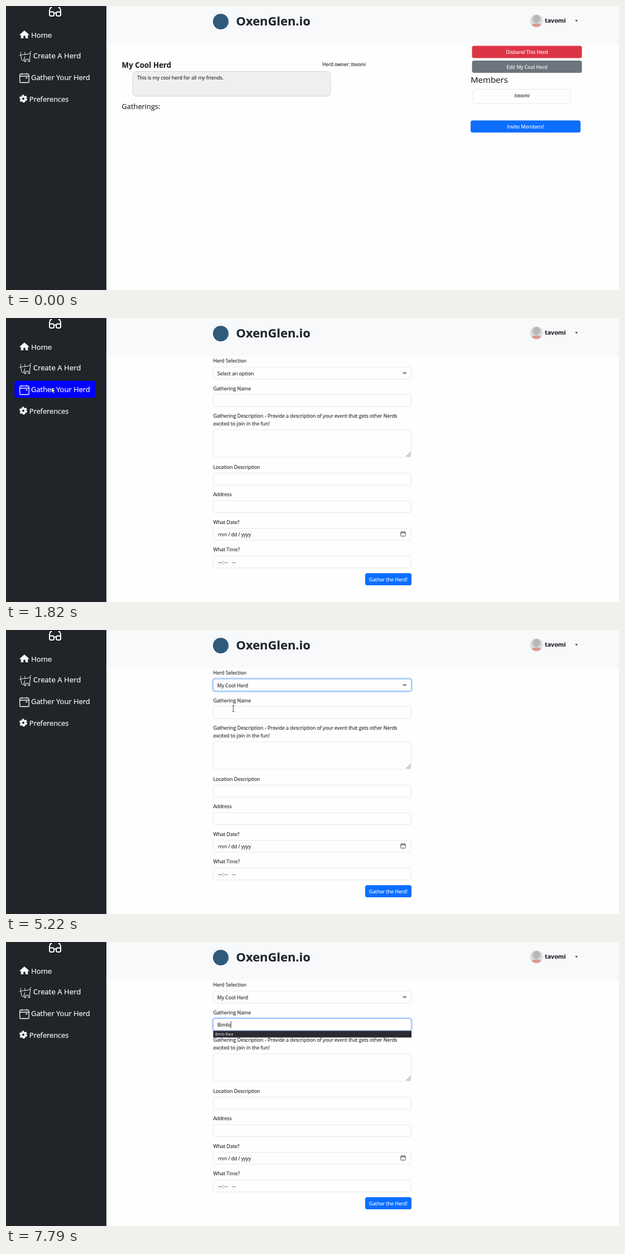
These frames come from a looping animation (1099 px wide and 510 px high, 8 s). An HTML page:

```html
<!DOCTYPE html>
<html lang="en">
<head>
<meta charset="utf-8">
<title>Gather your herd</title>
<style>
  html, body { margin: 0; width: 100%; height: 100%; overflow: hidden; background: #fefefe; }
  svg { display: block; width: 100vw; height: 100vh; }
  text { font: 8.8px "Open Sans", "Noto Sans", sans-serif; fill: #212529; stroke: #212529; stroke-width: .15; white-space: pre; }
  .nav text { font-size: 12.95px; fill: #fff; stroke: #fff; stroke-width: .2; }
  .nav .wide { font-size: 13.15px; }
  .nav .narrow { font-size: 12.75px; }
  .icon { fill: none; stroke: #fff; stroke-width: 1.3; stroke-linecap: round; stroke-linejoin: round; }
  .solid { fill: #fff; }
  .mid { text-anchor: middle; }
  .light { fill: #fff; stroke: #fff; }
  .bold { font-weight: 700; }
  .italic { font-style: italic; }
  .field { fill: #fefefe; stroke: #dee2e6; stroke-width: .8; }
  .mark { fill: none; stroke: #343a40; stroke-width: 1.1; stroke-linecap: round; stroke-linejoin: round; }
  .thin { stroke-width: .9; }
  #suggest text { font-size: 6.3px; fill: #fbfbfe; stroke: none; }
</style>
</head>
<body>
<svg viewBox="0 0 1099 510" preserveAspectRatio="none">
  <defs>
    <g id="ring">
      <rect x="370.2" y="-1.3" width="357.6" height="24.1" rx="4.6" fill="none" stroke="#0d6efd" stroke-opacity=".25" stroke-width="2.3"/>
      <rect x="371.5" width="355" height="21.5" rx="3.5" fill="none" stroke="#86b7fe" stroke-width=".9"/>
    </g>
    <rect id="input" class="field" x="371.5" width="355" height="21.5" rx="3.5"/>
  </defs>

  <rect width="1099" height="510" fill="#fefefe"/>
  <rect x="180" width="919" height="69" fill="#f8f9fb"/>
  <rect width="180" height="510" fill="#212529"/>

  <g class="nav">
    <rect id="hover" x="15.2" y="112.8" width="144.8" height="30.5" rx="3.5" fill="#00f"/>
    <g class="icon" style="stroke-width:2">
      <rect x="78" y="10.5" width="8" height="7.5" rx="2.8"/>
      <rect x="90" y="10.5" width="8" height="7.5" rx="2.8"/>
      <path d="M86 12.5h4M78 13V8l1.6-5h2M98 13V8l-1.6-5h-2"/>
    </g>
    <path class="solid" d="M33 44l8.4 7.3-1 1.2h-1.2V58h-4.4v-4.5h-3.6V58h-4.4v-5.5h-1.2l-1-1.2z"/>
    <g class="icon" style="stroke-width:1">
      <path d="M26.5 83c-1.500 3 0 4.500 2.500 4.500h2c2.500 0 4-1.500 2.500-4.500M27.500 88l-3 .5 2.500 2 1 5.500 1.500 2h1.500l1.500-2 1-5"/>
      <path d="M33.500 87.500c3-1.500 6-.5 10-2.500v-2l1-1.500M43.500 85c.5 4-1 6-1 9v6H40v-5c-2 1-3 1-4.500.5V100H33v-4"/>
    </g>
    <g class="icon">
      <rect x="24.7" y="122.2" width="16.5" height="15.3" rx="2"/>
      <path d="M25 126h16M28.5 120.8v1.5M37.3 120.8v1.5"/>
      <rect x="36" y="128.5" width="2" height="1.5" fill="#fff" stroke-width=".6"/>
    </g>
    <circle cx="31" cy="166.5" r="3.8" fill="none" stroke="#fff" stroke-width="3.4"/>
    <circle cx="31" cy="166.5" r="6" fill="none" stroke="#fff" stroke-width="2.2" stroke-dasharray="3.6 2.683"/>
    <text class="wide" x="45" y="56.5">Home</text>
    <text class="wide" x="48.8" y="94.3">Create A Herd</text>
    <text x="45" y="133.3">Gather Your Herd</text>
    <text class="narrow" x="41.8" y="171.5">Preferences</text>
  </g>

  <circle cx="385" cy="28" r="14" fill="#2f5a7c"/>
  <text class="bold" x="412.5" y="34.7" style="font-size:21.9px">OxenGlen.io</text>
  <circle cx="951" cy="26.5" r="11.5" fill="#dcdcdc"/>
  <path d="M942 33.5q9-5 18 0a11.5 11.5 0 0 1-18 0z" fill="#d99a92"/>
  <circle cx="951.2" cy="23" r="7" fill="#b9b9b9"/>
  <text class="bold" x="966" y="29.7" style="font-size:10.7px">tavomi</text>
  <path d="M1020.2 25.3h5l-2.5 2.7z" fill="#212529"/>

  <g id="herd">
    <text class="bold" x="207.5" y="110.7" style="font-size:13.4px">My Cool Herd</text>
    <text x="567" y="108" style="font-size:8.6px">Herd owner: <tspan class="italic">tavomi</tspan></text>
    <rect x="227.5" y="117.5" width="354" height="44.5" rx="6" fill="#efefef" stroke="#d0d3d6"/>
    <text x="235" y="131.5">This is my cool herd for all my friends.</text>
    <text x="207.5" y="184.7" style="font-size:12.85px">Gatherings:</text>
    <rect x="835.5" y="71.5" width="197" height="22" rx="3.5" fill="#dc3545"/>
    <text class="mid light" x="934" y="86.2">Disband This Herd</text>
    <rect x="835.5" y="98" width="197" height="22" rx="3.5" fill="#6c757d"/>
    <text class="mid light" x="934" y="112.8">Edit My Cool Herd</text>
    <text x="833" y="138" style="font-size:15px">Members</text>
    <rect class="field" x="837.5" y="149.5" width="175" height="25.5" rx="3.5"/>
    <text class="mid italic" x="925.2" y="164.3">tavomi</text>
    <rect x="833" y="205.5" width="197" height="21.8" rx="3.5" fill="#0d6efd"/>
    <text class="mid light" x="931.7" y="220">Invite Members!</text>
  </g>

  <g id="form">
    <text x="371.5" y="80.2">Herd Selection</text>
    <text x="371.5" y="129.7">Gathering Name</text>
    <text x="371.5" y="179.3">Gathering Description - Provide a description of your event that gets other Nerds</text>
    <text x="371.5" y="193.2">excited to join in the fun!</text>
    <text x="371.5" y="270.5">Location Description</text>
    <text x="371.5" y="320.2">Address</text>
    <text x="371.5" y="369.8">What Date?</text>
    <text x="371.5" y="419.3">What Time?</text>
    <use href="#input" y="88"/>
    <use href="#input" y="137.5"/>
    <rect class="field" x="371.5" y="201" width="355" height="49" rx="3.5"/>
    <use href="#input" y="278.5"/>
    <use href="#input" y="328"/>
    <use href="#input" y="377.5"/>
    <use href="#input" y="427.3"/>
    <path d="M717.5 249l8-8M720.5 249l5-5M723.5 249l2-2" stroke="#6c6f80" fill="none"/>
    <path class="mark" d="M712 97.5l2.7 2.7 2.7-2.7"/>
    <rect class="mark thin" x="707.7" y="384.3" width="8.4" height="7.5" rx="1"/>
    <path class="mark thin" d="M708 386h8M709.8 383.3v1M714 383.3v1"/>
    <text id="choice" x="378.7" y="102.6"></text>
    <text x="380.5" y="392.2" style="font-size:8.5px">mm / dd / yyyy</text>
    <text x="380.5" y="442" style="letter-spacing:1px">--:--  --</text>
    <rect x="644" y="458.3" width="83" height="21.7" rx="3.5" fill="#0d6efd"/>
    <text class="mid light" x="685.3" y="472.8">Gather the Herd!</text>
    <use id="selectRing" href="#ring" y="88"/>
    <use id="nameRing" href="#ring" y="137.5"/>
    <text id="typed" x="379" y="152.2"></text>
    <rect id="caret" y="142.5" width="1" height="12" fill="#212529"/>
    <g id="options">
      <rect x="372" y="110" width="354.5" height="41.5" fill="#fff" stroke="#8f8f9d" stroke-width=".9"/>
      <rect id="row" x="374.5" width="349.5" height="18" fill="#e0e0e6"/>
      <text x="378" y="125.2">Select an option</text>
      <text x="378" y="143.7">My Cool Herd</text>
    </g>
    <g id="suggest">
      <rect id="suggestBox" x="371.5" y="159.5" width="355.5" fill="#2b2a33"/>
      <text x="375" y="168">Bimlo Race</text>
      <g id="more">
        <text x="375" y="179.6">Board Games</text>
        <text x="375" y="191.2">Book Club</text>
        <text x="375" y="202.8">Bonfire</text>
        <text x="375" y="214.4">Bowling</text>
        <text x="375" y="226">Brunch</text>
      </g>
    </g>
  </g>

  <g id="cursor">
    <path id="arrow" d="M0 0v9.8l2.300-2 1.500 3.500 1.700-.8-1.500-3.300h3z" fill="#fff" stroke="#23232b" stroke-width=".9"/>
    <path id="beam" d="M-2-5.500h1.500l.5.500.5-.5H2M0-5V5M-2 5.500h1.500L0 5l.5.500H2" fill="none" stroke="#33363a" stroke-width=".9"/>
  </g>
</svg>
<script>
  const LOOP = 8000;
  const WORD = "Bimlo";
  const KEY_TIMES = [7200, 7350, 7490, 7640, 7780];

  // Pointer waypoints: time, x, y
  const PATH = [
    [240, 1, 442], [1000, 78, 160], [1070, 80, 115.5], [1270, 80, 115.5], [1340, 81.5, 124.5],
    [2150, 81.5, 124.5], [2210, 83, 128], [2560, 84, 128], [2760, 309, 105.5],
    [3170, 411, 98], [3370, 408, 104], [3710, 408, 105], [3910, 407, 137],
    [4300, 407, 138], [4360, 407.5, 141], [5220, 407.5, 141], [5560, 396, 148], [6040, 396, 148],
    [6350, 365, 156], [6500, 347, 161], [6640, 349, 162.5], [6780, 357, 144], [6930, 349, 131.5]
  ];

  const el = {};
  document.querySelectorAll("[id]").forEach(node => el[node.id] = node);

  const ramp = (t, from, to) => Math.min(1, Math.max(0, (t - from) / (to - from)));
  const within = (t, from, to) => t >= from && t < to;
  const show = (node, on) => node.style.display = on ? "" : "none";

  function pointer(t) {
    const next = PATH.findIndex(p => p[0] > t);
    if (next < 0) return PATH[PATH.length - 1].slice(1);
    if (next === 0) return PATH[0].slice(1);
    const a = PATH[next - 1], b = PATH[next], k = ramp(t, a[0], b[0]);
    return [a[1] + (b[1] - a[1]) * k, a[2] + (b[2] - a[2]) * k];
  }

  function draw(t) {
    const [x, y] = pointer(t);
    const beam = within(t, 4360, 6300);
    el.cursor.setAttribute("transform", `translate(${x} ${y})`);
    show(el.cursor, within(t, 240, 7200));
    show(el.arrow, !beam);
    show(el.beam, beam);

    el.hover.style.opacity = ramp(t, 960, 1070) * (1 - ramp(t, 2560, 3060));
    show(el.herd, t < 1690);
    show(el.form, t >= 1690);

    el.choice.textContent = t < 4300 ? "Select an option" : "My Cool Herd";
    el.selectRing.style.opacity = ramp(t, 3360, 3510) * (1 - ramp(t, 5580, 5730));
    el.nameRing.style.opacity = ramp(t, 5580, 5730);
    show(el.options, within(t, 3440, 4300));
    el.row.setAttribute("y", y > 131 ? 131.3 : 113);

    const count = KEY_TIMES.filter(key => t >= key).length;
    el.typed.textContent = WORD.slice(0, count);
    show(el.caret, within(t, 5600, 6130) || t >= 6600);
    el.caret.setAttribute("x", 379 + (count ? el.typed.getComputedTextLength() : 0));
    show(el.suggest, t >= 7270);
    show(el.more, count < 2);
    el.suggestBox.setAttribute("height", count < 2 ? 70 : 12);
  }

  function tick() {
    draw(performance.now() % LOOP);
    requestAnimationFrame(tick);
  }
  tick();
</script>
</body>
</html>
```
